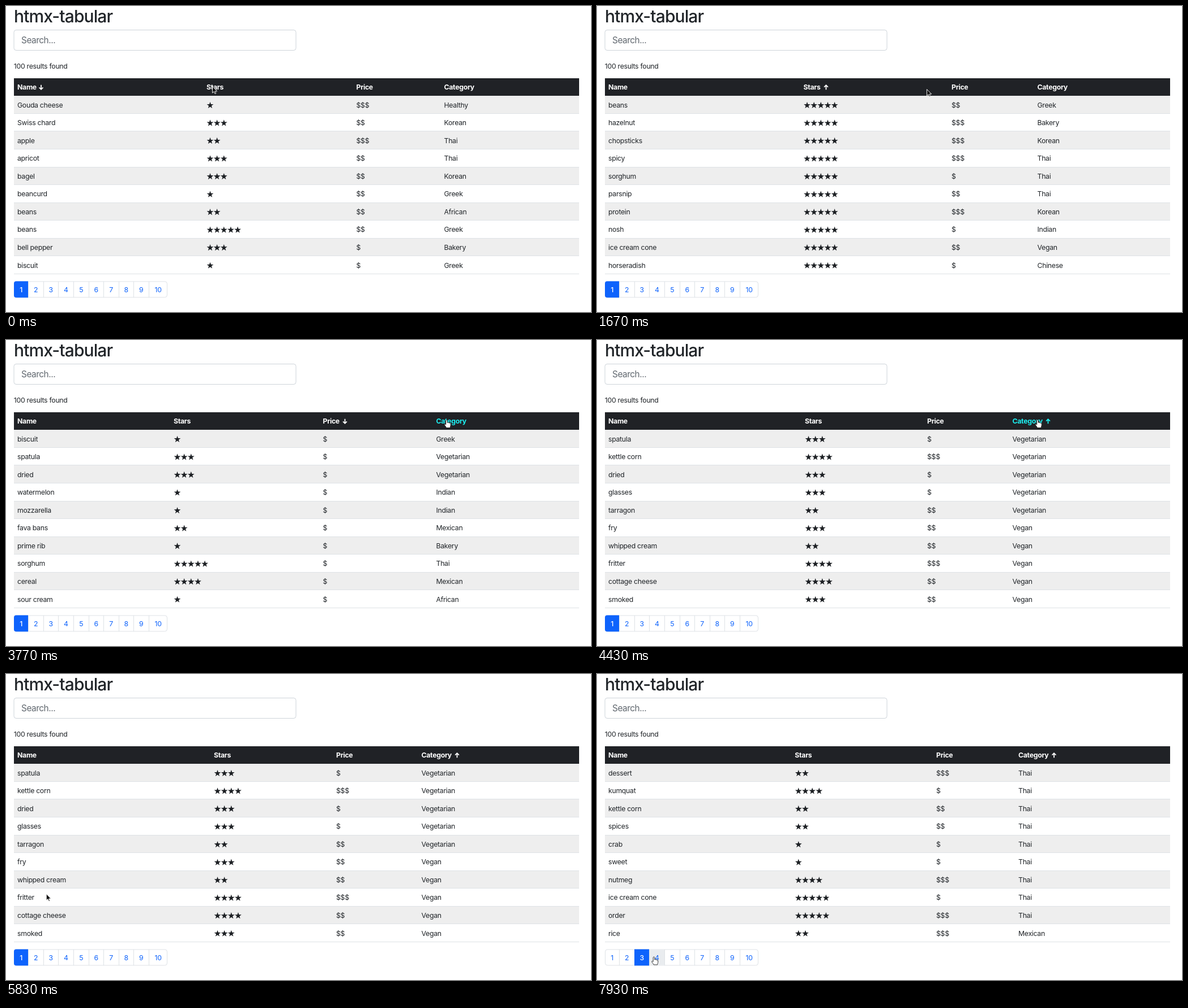
Animation of 1033x542 px, one loop 8000 ms. Source, as an HTML page:

```html
<!DOCTYPE html>
<html lang="en">
<head>
<meta charset="utf-8">
<title>htmx-tabular</title>
<style>
  html, body { margin: 0; width: 100%; height: 100%; overflow: hidden; background: #fff; }
  svg { display: block; width: 1033px; height: 542px; }
  text {
    font: 400 12.3px Inter, "Open Sans", sans-serif;
    font-optical-sizing: none;
    letter-spacing: -0.025em;
    fill: #212529;
  }
  .title { font-size: 30px; font-weight: 500; letter-spacing: -0.03em; }
  .hint { font-size: 15.36px; letter-spacing: -0.03em; fill: #61686f; }
  .head { font-weight: 700; fill: #fff; }
  .page { text-anchor: middle; fill: #0e63fc; }
  .on { fill: #fff; font-weight: 500; }
</style>
</head>
<body>
<svg viewBox="0 0 1033 542">
  <defs>
    <path id="star" fill="#1d2024"/>
    <path id="down" d="M0-4.2V3.6M-3.4.4L0 3.8L3.4.4" fill="none" stroke-width="1.8"/>
  </defs>
  <text class="title" x="14" y="28.5">htmx-tabular</text>
  <rect x="14" y="42.5" width="498" height="36" rx="4" fill="#fff" stroke="#ced4da"/>
  <text class="hint" x="27" y="66.3">Search...</text>
  <text x="13.8" y="111.3">100 results found</text>
  <g id="body"></g>
  <g id="head"></g>
  <g id="pager"></g>
  <g id="cursor">
    <path id="arrow" d="M0 0V11.5L2.7 9L4.5 13L6.3 12.2L4.6 8.4H8.2Z" fill="#111" stroke="#fff" stroke-width=".9"/>
    <path id="hand" d="M-1.3 8.5V1.2C-1.3-.4 1.2-.4 1.2 1.2V5C1.6 4 3.3 4.2 3.4 5.4C4 4.6 5.3 5 5.4 6C6.2 5.5 7.2 6 7.2 7V9.5C7.2 11 6.3 12 6.1 14H-.4C-.8 12.4-2.6 10.8-3.6 9C-4.4 7.6-2.8 6.8-1.3 8.5Z" fill="#fff" stroke="#222" stroke-width=".9"/>
  </g>
</svg>
<script>
const LOOP = 8000, LAG = 60;
const LEFT = 14, RIGHT = 1012, TOP = 159.4, ROW = 31.54;
const $ = id => document.getElementById(id);

const LABELS = ['Name', 'Stars', 'Price', 'Category'];
const WIDTHS = [34, 32, 31, 55];
const EDGES = [14, 39, 66, 92, 119, 146, 172, 199, 225, 252, 285];
const KINDS = {
  A: 'African', B: 'Bakery', C: 'Chinese', E: 'Vegetarian', G: 'Greek', H: 'Healthy',
  I: 'Indian', K: 'Korean', M: 'Mexican', T: 'Thai', V: 'Vegan'
};

// Rows: name, then stars, price level and category key.
const VIEWS = [
  { at: 0, cols: [20, 354, 618.5, 773.5], sort: 0, up: false, page: 1,
    rows: 'Gouda cheese:13H,Swiss chard:32K,apple:23T,apricot:32T,bagel:32K,beancurd:12G,beans:22A,beans:52G,bell pepper:31B,biscuit:11G' },
  { at: 660, cols: [20, 374, 595, 759], sort: 1, up: false, page: 1,
    rows: 'biscuit:11G,beancurd:12G,watermelon:11I,Gouda cheese:13H,mozzarella:11I,prime rib:11B,soy:11V,crab:11T,sweet:11T,sour cream:11A' },
  { at: 1130, cols: [20, 364.5, 626, 777.5], sort: 1, up: true, page: 1,
    rows: 'beans:52G,hazelnut:53B,chopsticks:53K,spicy:53T,sorghum:51T,parsnip:52T,protein:53K,nosh:51I,ice cream cone:52V,horseradish:51C' },
  { at: 2000, cols: [20, 296, 559.5, 759.5], sort: 2, up: false, page: 1,
    rows: 'biscuit:11G,spatula:31E,dried:31E,watermelon:11I,mozzarella:11I,fava bans:21M,prime rib:11B,sorghum:51T,cereal:41M,sour cream:11A' },
  { at: 3800, cols: [20, 368, 611, 752], sort: 3, up: false, page: 1,
    rows: 'sour cream:11A,beans:22A,lentil:32A,cream of tartar:43A,peanut:21A,pancake:52A,mango:33A,cabbage:12A,plum:41B,hazelnut:53B' },
  { at: 4170, cols: [20, 367, 583, 733.5], sort: 3, up: true, page: 1,
    rows: 'spatula:31E,kettle corn:43E,dried:31E,glasses:31E,tarragon:22E,fry:32V,whipped cream:22V,fritter:43V,cottage cheese:42V,smoked:32V' },
  { at: 6210, cols: [20, 349.3, 599, 744], sort: 3, up: true, page: 2,
    rows: 'sweet:31V,ice cream cone:52V,soy:11V,cook:53V,olive:23V,apricot:32T,apple:23T,spicy:53T,sorghum:51T,parsnip:52T' },
  { at: 7200, cols: [20, 349.3, 599, 744], sort: 3, up: true, page: 3,
    rows: 'dessert:23T,kumquat:41T,kettle corn:22T,spices:22T,crab:11T,sweet:11T,nutmeg:43T,ice cream cone:51T,order:53T,rice:23M' }
];

// Pointer moves: start, end, x, y.
const START = [370, 170];
const MOVES = [
  [-120, 0, 364.5, 142.5],
  [30, 100, 366, 144],
  [690, 950, 384, 146],
  [1400, 1791, 640, 148],
  [2530, 2730, 792, 149],
  [2790, 3100, 778, 141.5],
  [4430, 5070, 98, 198.5],
  [5070, 5230, 96, 201],
  [5370, 6150, 57, 498],
  [6730, 7080, 78, 500],
  [7570, 7910, 100.5, 501]
];

function pointer(t) {
  let [x, y] = START;
  for (const [from, to, tx, ty] of MOVES) {
    const u = Math.min(1, Math.max(0, (t - from) / (to - from)));
    const s = u * u * (3 - 2 * u);
    x += (tx - x) * s;
    y += (ty - y) * s;
  }
  return [x, y];
}

function starPath(r) {
  let d = '';
  for (let i = 0; i < 10; i++) {
    const a = i * Math.PI / 5, k = i % 2 ? r * 0.4 : r;
    d += (i ? 'L' : 'M') + (Math.sin(a) * k).toFixed(2) + ' ' + (-Math.cos(a) * k).toFixed(2);
  }
  return d + 'Z';
}

const text = (x, y, s, cls = '') => `<text class="${cls}" x="${x}" y="${y}">${s}</text>`;
const rect = (x, y, w, h, fill) => `<rect x="${x}" y="${y}" width="${w}" height="${h}" fill="${fill}"/>`;

function bodyMarkup({ cols, rows }) {
  return rows.split(',').map((row, i) => {
    const [name, [stars, price, kind]] = row.split(':');
    const top = Math.round(TOP + ROW * i), end = Math.round(TOP + ROW * (i + 1));
    const mid = TOP + ROW * (i + 0.5) + 0.3, base = mid + 4.2;
    let out = i % 2 ? '' : rect(LEFT, top, RIGHT - LEFT, end - top, '#eee');
    out += rect(LEFT, end - 1, RIGHT - LEFT, 1, '#dee2e6');
    out += text(cols[0], base, name);
    for (let k = 0; k < +stars; k++) {
      out += `<use href="#star" x="${cols[1] + 6.5 + 12.15 * k}" y="${mid + 0.5}"/>`;
    }
    return out + text(cols[2], base, '$'.repeat(+price)) + text(cols[3], base, KINDS[kind]);
  }).join('');
}

function headMarkup({ cols, sort, up }, hot) {
  let out = rect(LEFT, 128, RIGHT - LEFT, 31, '#202226');
  LABELS.forEach((label, i) => {
    const color = i === hot ? '#1cf0f2' : '#fff';
    out += `<g style="--c:${color}">` + text(cols[i], 148.4, label, 'head').replace('<text', `<text style="fill:${color}"`);
    if (i === sort) {
      const x = cols[i] + WIDTHS[i] + 8;
      out += `<use href="#down" stroke="${color}" transform="translate(${x} 144) scale(1 ${up ? -1 : 1})"/>`;
    }
    out += '</g>';
  });
  return out;
}

function pagerMarkup(page, hot) {
  let out = '<rect x="14.5" y="488" width="270" height="28" rx="4" fill="#fff" stroke="#dee2e6"/>';
  for (let n = 1; n <= 10; n++) {
    const x = EDGES[n - 1], w = EDGES[n] - x, on = n === page;
    if (n > 1) out += rect(x, 488, 1, 28, '#dee2e6');
    if (on && n === 1) {
      out += `<path d="M39 487.5H18a4 4 0 0 0-4 4V512.500a4 4 0 0 0 4 4H39Z" fill="#0e63fc"/>`;
    } else if (on) {
      out += rect(x, 487.5, w, 29, '#0e63fc');
    } else if (n === hot) {
      out += rect(x + 1, 488.5, w - 1, 27, '#e9ecef');
    }
    out += text(x + w / 2 + 0.2, 506.7, n, on ? 'page on' : 'page');
  }
  return out;
}

function hitHead({ cols, sort }, x, y) {
  if (y < 137 || y > 152) return -1;
  return cols.findIndex((c, i) => x >= c && x <= c + WIDTHS[i] + (i === sort ? 12 : 0));
}

function hitPage(x, y) {
  if (y < 488 || y > 517 || x < EDGES[0] || x > EDGES[10]) return 0;
  return EDGES.findIndex(e => e > x);
}

const shown = {};
function put(id, key, markup) {
  if (shown[id] === key) return;
  shown[id] = key;
  $(id).innerHTML = markup();
}

function draw(t) {
  const index = VIEWS.filter(v => v.at <= t).length - 1;
  const view = VIEWS[index];
  const [x, y] = pointer(t);
  const [hx, hy] = pointer(t - LAG);
  const col = hitHead(view, hx, hy), page = hitPage(hx, hy);
  const link = col >= 0 || page > 0;

  put('body', index, () => bodyMarkup(view));
  put('head', index + ':' + col, () => headMarkup(view, col));
  put('pager', view.page + ':' + page, () => pagerMarkup(view.page, page));

  $('cursor').setAttribute('transform', `translate(${x.toFixed(2)} ${y.toFixed(2)})`);
  $('arrow').style.display = link ? 'none' : '';
  $('hand').style.display = link ? '' : 'none';
}

$('star').setAttribute('d', starPath(6.2));
const begin = performance.now();
function tick() {
  draw((performance.now() - begin) % LOOP);
  requestAnimationFrame(tick);
}
tick();
</script>
</body>
</html>
```
